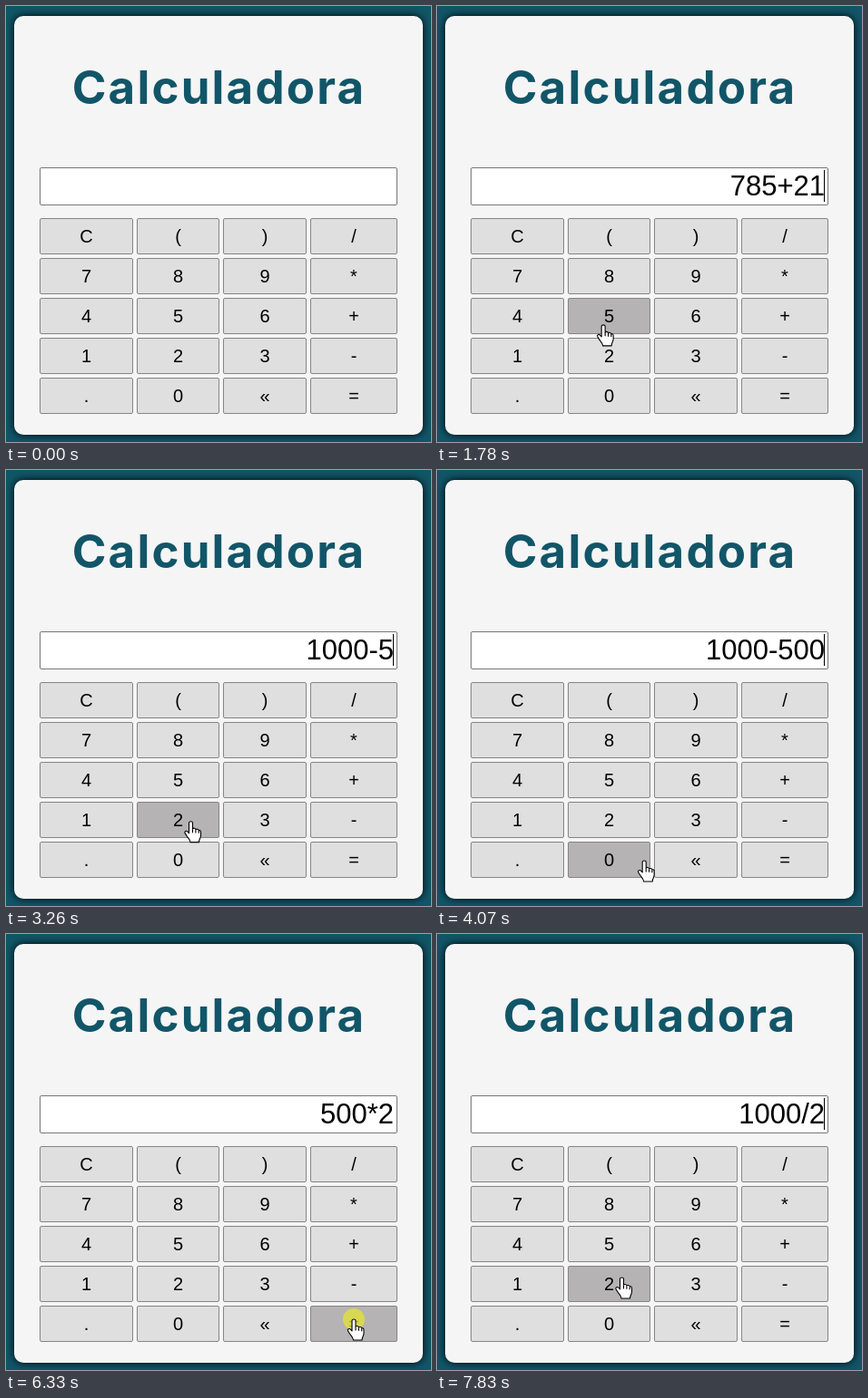
These frames come from a looping animation (468x481 px, 8 s). An HTML page with a canvas:

```html
<!DOCTYPE html>
<html lang="es">
<head>
<meta charset="utf-8">
<title>Calculadora</title>
<style>
  html, body { margin: 0; width: 100%; height: 100%; overflow: hidden; background: #115668; }
  canvas { display: block; }
</style>
</head>
<body>
<canvas id="stage" width="468" height="481"></canvas>
<script>
const ctx = document.getElementById("stage").getContext("2d");
const SANS = '"Liberation Sans", Arial, sans-serif';
const TEAL = "#115668";
const LOOP = 8000;
const BLINK = 530;
const HOLD = 100;    // how long a key stays pressed
const TRAVEL = 340;  // longest trip between keys
const GAP = 4;

const EDGES = [37, 144, 239, 335, 435];
const KEYS = ["C()/", "789*", "456+", "123-", ".0«="];
const buttons = KEYS.flatMap((row, r) => [...row].map((label, c) => ({
  label, x: EDGES[c], y: 234 + 44 * r, w: EDGES[c + 1] - EDGES[c] - GAP, h: 40
})));

// aim: offset from the key's centre; rest: wait between arriving and pressing
const taps = [
  { key: "7", at: 190 }, { key: "8", at: 400 }, { key: "5", at: 680 },
  { key: "+", at: 990, aim: [-21, 1] },
  { key: "2", at: 1290 }, { key: "1", at: 1540 }, { key: "5", at: 1860 }, { key: "=", at: 2240 },
  { key: "-", at: 2560, aim: [17, 6] },
  { key: "5", at: 3040 }, { key: "0", at: 3390 }, { key: "0", at: 3570 }, { key: "=", at: 4365 },
  { key: "*", at: 5020, aim: [25, 9] },
  { key: "2", at: 5340 },
  { key: "=", at: 6325, aim: [0, -5], rest: 385 },
  { key: "/", at: 7030 },
  { key: "2", at: 7690, aim: [14, -7] }
];

const OPS = {
  "+": (a, b) => a + b, "-": (a, b) => a - b,
  "*": (a, b) => a * b, "/": (a, b) => a / b
};

function evaluate(expr) {
  const [, a, op, b] = expr.match(/(\d+)(\D)(\d+)/);
  return String(OPS[op](+a, +b));
}

// turn the taps into trips and display values
let value = "";
let from = { x: 262, y: 449, free: 30 };
const steps = taps.map(({ key, at, aim = [14, 1], rest = 30 }) => {
  const b = buttons.find(b => b.label === key);
  const arrive = at - rest;
  value = key === "=" ? evaluate(value) : value + key;
  const step = {
    from, arrive, at, up: at + HOLD, value,
    depart: Math.max(from.free, arrive - TRAVEL),
    x: b.x + b.w / 2 + aim[0], y: b.y + b.h / 2 + aim[1]
  };
  from = { x: step.x, y: step.y, free: step.up + 20 };
  return step;
});

function pointerAt(t) {
  if (t < 30) return null;
  const s = steps.findLast(s => s.depart <= t) ?? steps[0];
  const u = Math.min(1, Math.max(0, (t - s.depart) / (s.arrive - s.depart)));
  const e = u * u * (3 - 2 * u);
  return { x: s.from.x + (s.x - s.from.x) * e, y: s.from.y + (s.y - s.from.y) * e };
}

const contains = (b, p) => p && p.x >= b.x && p.x < b.x + b.w && p.y >= b.y && p.y < b.y + b.h;

const HAND = new Path2D("M-2 13V1.6C-2-.5 2-.5 2 1.6V8.3C2.6 7 5.2 7.3 5.4 9 6.3 8 8.5 8.5 8.7 10 9.9 9.3 11 10.2 11 11.8V15.5C11 18.5 9 19.5 9 23H-.5C-.6 20-3.4 18-4.8 15.5L-6.5 12.7C-7.2 11-5 9.8-3.6 11.2Z");
const KNUCKLES = new Path2D("M2 8.5V12.5M5.4 9.2V12.8M8.7 10.2V13.2");
const ARROW = new Path2D("M0 0V16L3.8 12.4 6.4 18.6 9.2 17.4 6.6 11.4H11.6Z");

function box(x, y, w, h, r, fill, stroke) {
  ctx.beginPath();
  ctx.roundRect(x, y, w, h, r);
  ctx.fillStyle = fill;
  ctx.fill();
  if (!stroke) return;
  ctx.strokeStyle = stroke;
  ctx.lineWidth = 1;
  ctx.stroke();
}

function text(str, x, y, font, color = "#000", align = "center") {
  ctx.font = font;
  ctx.fillStyle = color;
  ctx.textAlign = align;
  ctx.fillText(str, x, y);
}

function drawCard() {
  ctx.fillStyle = TEAL;
  ctx.fillRect(0, 0, 468, 481);
  ctx.save();
  ctx.shadowColor = "#000";
  ctx.shadowBlur = 10;
  box(9, 11, 450, 462, 10, "#f5f5f5");
  ctx.restore();
  ctx.save();
  ctx.letterSpacing = "2.2px";
  text("Calculadora", 234.5, 108, "bold 51px Inter, sans-serif", TEAL);
  ctx.restore();
}

function drawDisplay(t) {
  box(37.5, 178.5, 393, 41, 1.5, "#fff", "#767676");
  const last = steps.findLast(s => s.up <= t);
  if (!last) return;
  text(last.value, 427, 209, "31px " + SANS, "#000", "right");
  if (Math.floor((t - last.up) / BLINK) % 2 === 0) ctx.fillRect(426, 181, 1, 35);
}

function drawKey(b, hovered) {
  box(b.x + .5, b.y + .5, b.w - 1, b.h - 1, 1.5, hovered ? "#b5b3b3" : "#dfdfdf", "#858585");
  text(b.label, b.x + b.w / 2, b.y + 27, "20px " + SANS);
}

function drawPointer(p, hand, pressed) {
  ctx.save();
  ctx.translate(p.x, p.y);
  if (pressed) {
    ctx.beginPath();
    ctx.arc(0, 0, 12, 0, 2 * Math.PI);
    ctx.fillStyle = "rgba(228, 228, 50, .75)";
    ctx.fill();
  }
  ctx.lineJoin = "round";
  ctx.lineWidth = 1.1;
  ctx.fillStyle = "#fff";
  ctx.strokeStyle = "#000";
  const shape = hand ? HAND : ARROW;
  ctx.fill(shape);
  ctx.stroke(shape);
  if (hand) ctx.stroke(KNUCKLES);
  ctx.restore();
}

function draw(now) {
  const t = now % LOOP;
  const p = pointerAt(t);
  const hovered = buttons.find(b => contains(b, p));
  drawCard();
  drawDisplay(t);
  for (const b of buttons) drawKey(b, b === hovered);
  if (p) drawPointer(p, hovered, steps.some(s => t >= s.at && t < s.up));
  requestAnimationFrame(draw);
}

requestAnimationFrame(draw);
</script>
</body>
</html>
```
